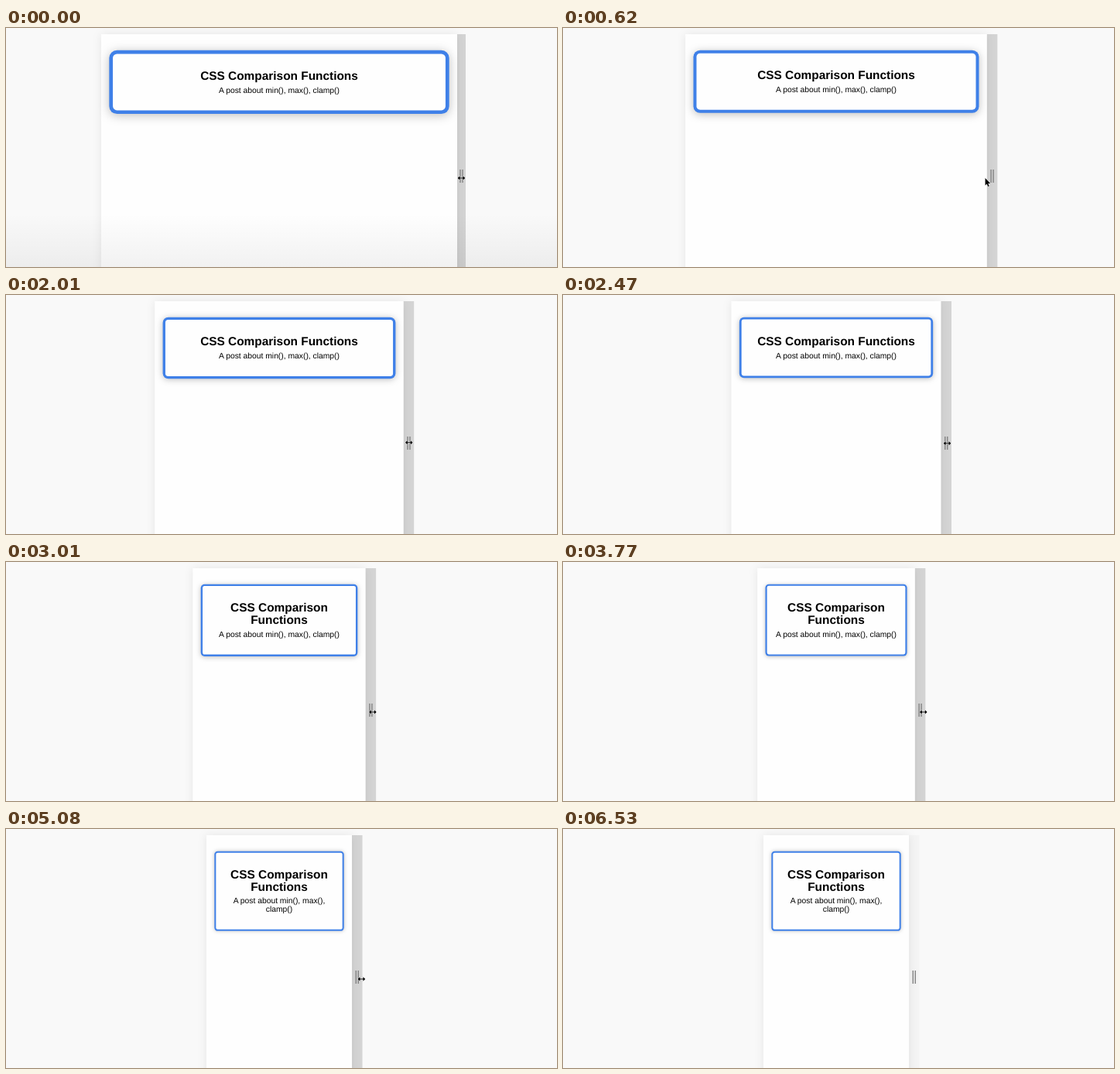
Animation of 712x309 px, one loop 7000 ms. Source, as an HTML page:

```html
<!DOCTYPE html>
<html lang="en">
<head>
<meta charset="utf-8">
<title>CSS Comparison Functions</title>
<style>
  html, body { margin: 0; width: 100%; height: 100%; overflow: hidden; background: #f9f9f9; }
  svg { display: block; width: 712px; height: 309px; }
  text { font-family: "Liberation Sans", Arial, sans-serif; text-anchor: middle; text-rendering: geometricPrecision; }
  .title { font-size: 15.42px; font-weight: 700; }
  .sub { font-size: 10.32px; }
  #panel { filter: drop-shadow(0 0 6px rgba(0, 0, 0, .08)); }
</style>
</head>
<body>
<svg viewBox="0 0 712 309">
  <defs>
    <linearGradient id="shade" x1="0" y1="0" x2="0" y2="1">
      <stop offset="0" stop-opacity="0"/>
      <stop offset="1" stop-opacity=".05"/>
    </linearGradient>
  </defs>
  <rect width="712" height="309" fill="#f9f9f9"/>
  <rect id="panel" y="8" height="340" fill="#fefefe"/>
  <rect id="handle" y="8" height="301"/>
  <g id="grip" fill="#828282">
    <rect x="-2.2" y="183" width="1.4" height="17"/>
    <rect x=".8" y="183" width="1.4" height="17"/>
  </g>
  <rect id="card" fill="#3f80e8"/>
  <rect id="inner" fill="#fefefe"/>
  <text class="title" x="353"></text>
  <text class="title" x="353"></text>
  <text class="sub" x="353"></text>
  <text class="sub" x="353"></text>
  <rect id="dim" y="240" width="712" height="69" fill="url(#shade)"/>
  <g stroke="#fff" stroke-width=".8" paint-order="stroke" stroke-linejoin="round">
    <path id="resize" d="M-4.8 0L-2-2.8V-.6H2V-2.8L4.8 0L2 2.8V.6H-2V2.8Z"/>
    <path id="arrow" d="M0 0V9.4L2.1 7.5L3.6 10.9L5.1 10.2L3.7 6.9H6.6Z"/>
  </g>
</svg>
<script>
const LOOP = 7000, MID = 353, TOP = 28.7, GAP = 10.32, LEAVE = 6230;
const $ = id => document.getElementById(id);
const titles = document.querySelectorAll('.title');
const subs = document.querySelectorAll('.sub');

// Each drag narrows the panel; power shapes its speed.
const START_WIDTH = 460;
const drags = [
  { from: 20, to: 780, width: 360, power: 1.5 },
  { from: 780, to: 1310, width: 327, power: .7 },
  { from: 1800, to: 2550, width: 257, power: 2 },
  { from: 2550, to: 3300, width: 214, power: .5 },
  { from: 3310, to: 4070, width: 197, power: 1 },
  { from: 4070, to: 4300, width: 188, power: 1 }
];

const clamp = (v, lo, hi) => Math.min(hi, Math.max(lo, v));
const part = (t, from, to) => clamp((t - from) / (to - from), 0, 1);
const hump = (t, from, to) => Math.sin(Math.PI * part(t, from, to));
const widthAt = t => drags.reduce(
  (w, d) => w + (d.width - w) * part(t, d.from, d.to) ** d.power, START_WIDTH);

function set(el, attrs) {
  for (const k in attrs) el.setAttribute(k, attrs[k]);
}

// Place one or two lines and return the height used.
function lines(nodes, texts, y, size) {
  nodes.forEach((node, i) => {
    const text = texts[i] || '';
    if (node.textContent !== text) node.textContent = text;
    node.setAttribute('y', y + size * (i + .82));
  });
  return texts.length * size;
}

function drawCard(left, w) {
  const border = (w + 13.5) / 100, radius = w * .022;
  const x = left + GAP, width = w - 2 * GAP;
  const room = width - 2 * border - 2 * GAP;
  let y = TOP + border + 2 * GAP;
  y += lines(titles, room < 204.5 ? ['CSS Comparison', 'Functions'] : ['CSS Comparison Functions'], y, 15.6) + GAP / 2;
  y += lines(subs, room < 156.5 ? ['A post about min(), max(),', 'clamp()'] : ['A post about min(), max(), clamp()'], y, 10.6);
  const height = y + 2 * GAP + border - TOP + .3;
  set($('card'), { x, y: TOP, width, height, rx: radius });
  set($('inner'), {
    x: x + border, y: TOP + border, rx: radius - border,
    width: width - 2 * border, height: height - 2 * border
  });
  $('card').style.filter = `drop-shadow(0 ${w / 190}px ${w / 72}px rgba(0,0,0,.25))`;
}

function drawCursor(t, grip) {
  const leave = part(t, LEAVE, LEAVE + 300);
  const drift = clamp((t - 1900) / 450, 0, 5.7);
  const x = grip + drift - 9 * hump(t, 0, 1240) + 100 * leave;
  const y = 194 - 3.3 * hump(t, 800, 3000) - 214 * leave;
  const pointer = t > 540 && t < 780 || leave > 0;
  const transform = `translate(${x} ${y})`;
  set($('resize'), { transform, visibility: pointer ? 'hidden' : 'visible' });
  set($('arrow'), { transform, visibility: pointer ? 'visible' : 'hidden' });
}

function render(t) {
  const w = widthAt(t), left = MID - w / 2, right = MID + w / 2;
  const thick = Math.min(13.5, 594 - right), grip = right + thick / 2;
  set($('panel'), { x: left, width: w });
  set($('handle'), { x: right, width: thick, 'fill-opacity': .15 - .13 * part(t, LEAVE, LEAVE + 300) });
  set($('grip'), { transform: `translate(${grip} 0)` });
  set($('dim'), { opacity: 1 - part(t, 0, 520) });
  drawCard(left, w);
  drawCursor(t, grip);
}

const start = performance.now();
function tick() {
  render((performance.now() - start) % LOOP);
  requestAnimationFrame(tick);
}
tick();
</script>
</body>
</html>
```
